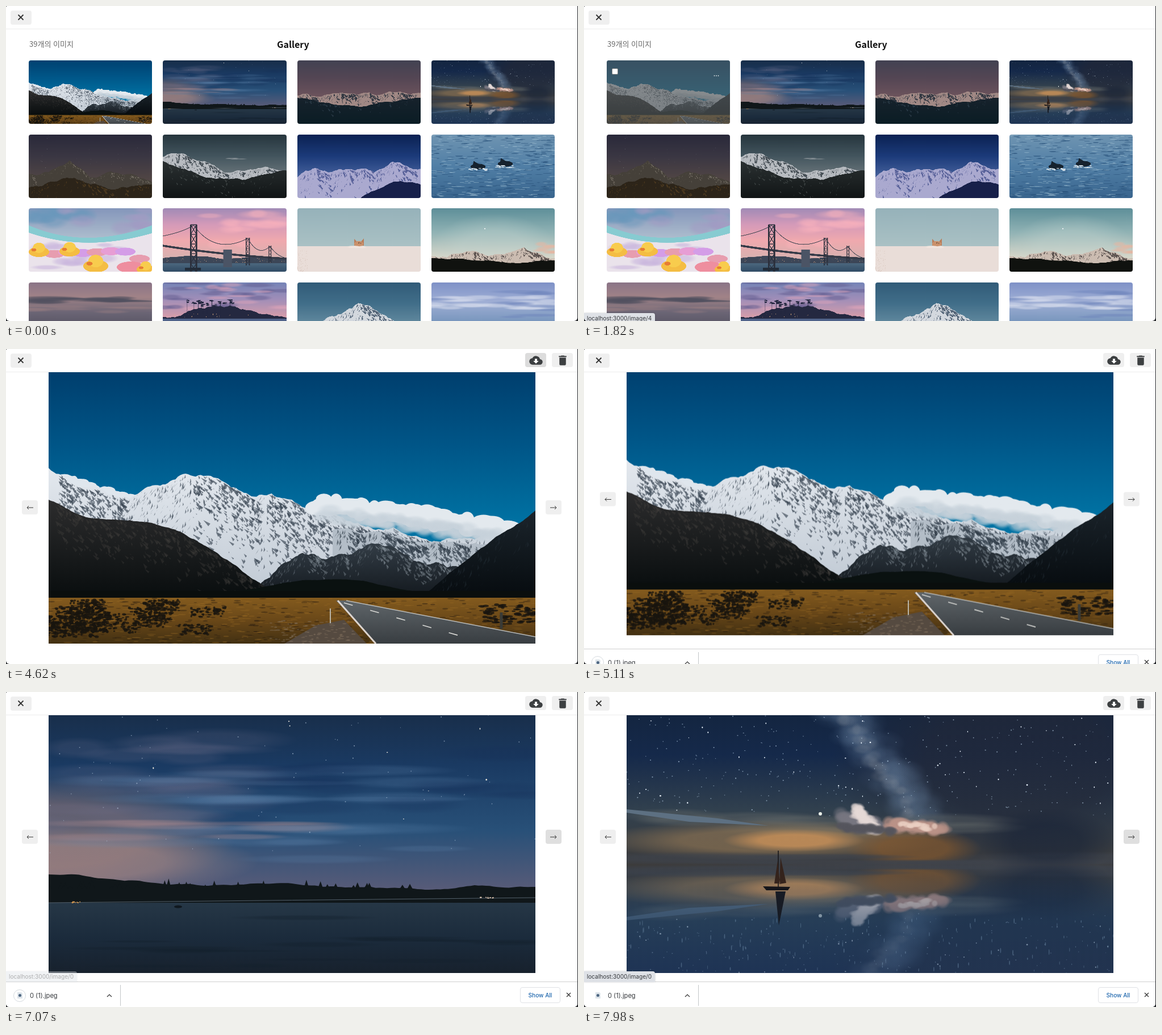
Write an HTML page with a canvas that moves like this. It is 1007x556 px and loops after 8 s.

```html
<!DOCTYPE html>
<html lang="ko">
<head>
<meta charset="utf-8">
<title>Gallery</title>
<style>
html, body { margin: 0; width: 100%; height: 100%; overflow: hidden; background: #26282b; }
div, canvas, svg, span { position: absolute; box-sizing: border-box; white-space: nowrap; }
#win { left: 0; top: 0; width: 1006px; height: 556px; background: #fff; border-radius: 3px 0 6px 6px; overflow: hidden; }
#gallery, #detail { inset: 0; }
#head { left: 0; top: 0; width: 1006px; height: 41px; background: #fff; border-bottom: 1px solid #ececec; }
.btn { background: #efefef; border-radius: 4px; width: 37px; height: 25px; }
.btn svg { left: 50%; top: 50%; transform: translate(-50%, -50%); }
.nav { width: 28px; top: 266.5px; }
svg { fill: #3c3f41; overflow: visible; }
.line { fill: none; stroke: #333; }
.cjk { font-family: "Noto Sans CJK KR", "Noto Sans CJK", sans-serif; }
.ui { font-family: Inter, sans-serif; font-size: 10.1px; line-height: 16px; color: #33363a; }
.tile { width: 217.5px; height: 112px; border-radius: 4px; overflow: hidden; }
.tile canvas { width: 100%; height: 100%; object-fit: cover; }
#hover { inset: 0; background: rgba(86, 90, 92, .66); }
#check { left: 9.5px; top: 14px; width: 11px; height: 11px; background: #fff; border: 1px solid #858585; border-radius: 2px; }
#more { left: 188px; top: 14px; color: #fff; font: 13px/18px "Noto Sans", sans-serif; }
#big { left: 74.5px; top: 38px; }
#spin { left: 491px; top: 267px; }
#status { left: 0; width: 125px; height: 19px; padding: 1px 5px; background: #dee1e6; border-radius: 0 4px 0 0; box-shadow: 0 0 3px #0003; }
#shelf { left: 0; width: 1006px; height: 45px; background: #fff; border-top: 1px solid #cfcfcf; }
#ring { left: 13px; top: 12.5px; width: 22px; height: 22px; border: 1.2px solid #d5dade; border-radius: 50%; }
#all { left: 905px; top: 9px; width: 71px; height: 28px; border: 1px solid #dfe1e5; border-radius: 4px; color: #1d66ad; font-weight: 500; line-height: 27px; text-align: center; }
</style>
</head>
<body>
<div id="win">
  <div id="gallery">
    <span class="cjk" style="left:41px;top:57px;font-size:13px;line-height:20px;color:#666">39개의 이미지</span>
    <span class="cjk" style="left:477px;top:55px;font-size:16px;line-height:24px;font-weight:700;color:#111">Gallery</span>
  </div>
  <div id="detail">
    <svg id="spin" width="24" height="24"><path d="M17 7A7 7 0 1 0 18.7 14" fill="none" stroke="#3c3f41" stroke-width="2"/><path d="M20 4v7h-7z"/></svg>
    <div id="photo">
      <canvas id="big" width="857" height="482"></canvas>
      <div class="btn nav" style="left:28px"><svg class="line" width="12" height="8"><path d="M12 5H1M4 2 1 5l3 3"/></svg></div>
      <div class="btn nav" id="next" style="left:950px"><svg class="line" width="12" height="8"><path d="M0 5h11M8 2l3 3-3 3"/></svg></div>
    </div>
  </div>
  <div id="head">
    <div class="btn" style="left:8px;top:7.5px"><svg class="line" width="9" height="9" style="left:18px" stroke-width="1.8"><path d="M0 0l9 9M9 0 0 9"/></svg></div>
    <div id="tools">
      <div class="btn" id="cloud" style="left:914px;top:7px"><svg width="23" height="23" viewBox="0 0 24 24"><path d="M6 20A6 6 0 0 1 5.4 8a7.5 7.5 0 0 1 14 2A5 5 0 0 1 19 20z"/><path d="M17 13l-5 5-5-5h3V9h4v4z" fill="#fff"/></svg></div>
      <div class="btn" style="left:961px;top:7px"><svg width="23" height="23" viewBox="0 0 24 24"><path d="M6 7h12v12q0 2-2 2H8q-2 0-2-2zM5 4h3.5l1-1h5l1 1H19v2H5z"/></svg></div>
    </div>
  </div>
  <div id="shelf" class="ui">
    <div id="ring"></div>
    <svg width="9" height="11" style="left:20px;top:18px"><path fill="#dde4ea" d="M0 0h7l2 2v9H0z"/><circle cx="4.5" cy="5.5" r="2.5" fill="#4c6580"/></svg>
    <span style="left:42px;top:16px;font-size:11.1px">0 (1).jpeg</span>
    <svg class="line" width="8" height="5" style="left:178px;top:21px" stroke-width="1.2"><path d="M0 5l4-4 4 4"/></svg>
    <div style="left:201px;top:5px;width:1px;height:37px;background:#c4c6c8"></div>
    <div id="all">Show All</div>
    <svg class="line" width="7" height="7" style="left:987px;top:19px" stroke-width="1.3"><path d="M0 0l7 7M7 0 0 7"/></svg>
  </div>
  <div id="status" class="ui"></div>
</div>
<script>
const $ = id => document.getElementById(id);
const W = 857, H = 482, UNIT = W / 217;
let c, seed, span;

const rnd = (lo, hi) => {
  seed = seed * 16807 % 2147483647;
  return lo + (hi - lo) * seed / 2147483647;
};
const repeat = (n, fn) => { for (let i = 0; i < n; i++) fn(i, i / n); };
const grad = (y0, y1, ...cols) => {
  const g = c.createLinearGradient(0, y0, 0, y1);
  cols.forEach((k, i) => g.addColorStop(i / (cols.length - 1), k));
  return g;
};
const box = (fill, x, y, w, h) => { c.fillStyle = fill; c.fillRect(x, y, w, h); };
const sky = (y1, ...cols) => box(grad(0, y1, ...cols), 0, -20, 900, 600);
const shape = (fill, d) => { c.fillStyle = fill; c.fill(new Path2D(d)); };
const line = (color, width, d) => {
  c.strokeStyle = color;
  c.lineWidth = width;
  c.stroke(new Path2D(d));
};
const dot = (fill, x, y, rx, ry = rx) => {
  c.beginPath();
  c.ellipse(x, y, rx, ry, 0, 0, 7);
  c.fillStyle = fill;
  c.fill();
};
// Soft ellipse; color is #rrggbbaa
const glow = (color, x, y, rx, ry) => {
  c.save();
  c.translate(x, y);
  c.scale(rx, ry);
  const g = c.createRadialGradient(0, 0, 0, 0, 0, 1);
  g.addColorStop(0, color);
  g.addColorStop(.5, color);
  g.addColorStop(1, color.slice(0, 7) + '00');
  box(g, -1, -1, 2, 2);
  c.restore();
};
// Random ellipses within a rectangle, hard or soft
const scatter = (n, fill, x0, y0, x1, y1, rx, ry = rx, draw = dot) =>
  repeat(n, () => draw(fill, rnd(x0, x1), rnd(y0, y1), rnd(.4, 1) * rx, rnd(.4, 1) * ry));
const wisps = (...args) => scatter(...args, glow);
const stars = (n, color, y1, r) => scatter(n, color, 0, 0, span, y1, r);
// Puffs along a straight line
const bank = (n, color, x0, y0, x1, y1, r, spread, draw = dot) => repeat(n, (i, k) =>
  draw(color, x0 + (x1 - x0) * k + rnd(-r, r) / 2, y0 + (y1 - y0) * k + rnd(-spread, spread), rnd(.4, 1) * r, rnd(.3, .6) * r));

// Fractal skyline through evenly spaced heights; rocks are shards running down its slopes
function ridge(heights, fill, rough, { x0 = 0, x1 = span, rock, n = 0, size = 4, depth = 30 } = {}) {
  let ys = heights;
  for (; ys.length < 120; rough /= 2)
    ys = ys.flatMap((y, i) => i ? [(y + ys[i - 1]) / 2 + rnd(-rough, rough) / 2, y] : [y]);
  const step = (x1 - x0) / (ys.length - 1);
  c.save();
  c.beginPath();
  ys.forEach((y, i) => c.lineTo(x0 + i * step, y));
  c.lineTo(x1, 600);
  c.lineTo(x0, 600);
  c.clip();
  box(fill, 0, -20, 900, 620);
  repeat(n, () => {
    const i = Math.floor(rnd(4, ys.length - 4));
    const x = x0 + i * step, y = ys[i] + rnd(0, 1) * rnd(.1, 1) * depth;
    const s = rnd(.2, 1) * size, w = Math.sign(ys[i + 4] - ys[i - 4]) * s * rnd(.1, 1.2);
    shape(rock, `M${x} ${y}l${w + s * .4} ${s * .7}l${-s * .4} ${s * .5}z`);
  });
  c.restore();
}

function valley() {
  sky(270, '#003e6d', '#005688', '#0072a3');
  bank(40, '#dfe6ed', 35, 192, 150, 232, 15, 4);
  ridge([172, 205, 226, 195, 186, 222, 228, 250, 280, 292, 298, 282, 290], grad(180, 380, '#e2e7ed', '#c3ccd6'), 22,
    { rock: '#3c4856aa', n: 2600, size: 9, depth: 165 });
  bank(110, '#e3e9ee', 478, 234, 810, 282, 25, 9);
  bank(70, '#c6d1da88', 490, 255, 790, 292, 26, 9, glow);
  ridge([282, 285, 300, 302, 305, 290], '#b3bdc7', 16, { x0: 500, rock: '#34404caa', n: 800, size: 10, depth: 75 });
  ridge([380, 322, 326, 310, 338, 345], grad(305, 390, '#333d46', '#161c22'), 24, { x0: 370, x1: 760, rock: '#a2adb855', n: 420, size: 9, depth: 45 });
  ridge([228, 262, 272, 315, 381], grad(230, 390, '#2c2c2d', '#0b0f10'), 14, { x1: 380, rock: '#47423f55', n: 380, size: 10, depth: 90 });
  ridge([402, 348, 293, 247], grad(247, 390, '#1b242b', '#080d11'), 8, { x0: 650, rock: '#2c374055', n: 160, size: 12, depth: 90 });
  ridge([388, 370, 371, 392], '#0a1110', 4, { x0: 340, x1: 660 });
  box('#0a0e0d', 0, 389, W, 13);
  box(grad(400, H, '#845b1e', '#694718', '#423012'), 0, 401, W, 82);
  scatter(420, '#a0702755', 0, 402, W, H, 9, 1.2);
  scatter(380, '#2a1f1277', 0, 402, W, H, 7, 1.3);
  repeat(22, () => {
    const x = rnd(0, 1) * rnd(0, 420), y = rnd(412, 462);
    scatter(55, '#19150fcc', x - 30, y - 9, x + 30, y + 9, 4, 2.5);
  });
  scatter(90, '#18140fcc', 760, 413, W, 448, 7, 2.5);
  shape('#554a40', 'M470 450L520 440L560 482H415z');
  scatter(110, '#84736077', 390, 440, 540, H, 4, 1.3);
  shape(grad(405, H, '#60666a', '#383d41'), 'M506 406H524L857 470V482H576z');
  line('#dcd4cf', 3, 'M509 406L576 482');
  line('#b9bab8', 1.4, 'M524 406L857 470');
  c.setLineDash([16, 32]);
  line('#d9d9d5', 1.6, 'M520 410L730 470');
  c.setLineDash([]);
  line('#b9b5a8', 2, 'M496 420v26');
  line('#393a36', 5, 'M797 427v29');
}

function lake() {
  sky(345, '#182b44', '#1a3a62', '#285078', '#5c5c78');
  glow('#94706c88', 0, 240, 330, 110);
  glow('#b8938a77', 40, 285, 330, 60);
  wisps(22, '#6f6e8a30', -30, 70, 330, 240, 160, 24);
  wisps(22, '#5f85ad35', 100, 120, 820, 290, 210, 13);
  wisps(7, '#a5868c55', 20, 205, 480, 250, 170, 11);
  wisps(12, '#132b5535', 320, 90, 860, 240, 150, 20);
  stars(80, '#b6c8dcaa', 270, 1.1);
  stars(8, '#e6e4dc', 270, 1.8);
  ridge([308, 316, 326, 327, 324, 331, 333, 327, 330], '#10171a', 8);
  repeat(45, () => {
    const x = rnd(0, W * .75), h = rnd(0, 1) * rnd(2, 16);
    shape('#10171a', `M${x} ${329 - h}l5 ${h + 5}h-10z`);
  });
  box(grad(357, H, '#263746', '#1b2b3c', '#17212d'), 0, 358, W, 130);
  wisps(18, '#13202c66', 0, 375, W, 470, 150, 6);
  line('#53606b', 1, 'M0 358L857 349');
  scatter(12, '#d89a52', 38, 356, 58, 358, 2, 1);
  scatter(9, '#f2d6c0', 757, 347, 790, 350, 2, 1.2);
  dot('#10181f', 228, 365, 7, 2.5);
}

function boat() {
  sky(291, '#13243d', '#15294a', '#31404e', '#3c3b3b');
  glow('#222838bb', 690, 110, 330, 190);
  bank(50, '#6d88a81a', 365, 0, 525, 215, 55, 8, glow);
  bank(26, '#7e879433', 380, 20, 510, 210, 22, 8, glow);
  stars(330, '#bed5ec99', 205, 1.2);
  stars(45, '#edf6ff', 195, 1.5);
  wisps(10, '#6b706e55', 0, 203, 640, 235, 180, 16);
  glow('#8e7453aa', 250, 248, 310, 36);
  glow('#c28d58dd', 295, 248, 125, 20);
  glow('#80572fbb', 505, 262, 120, 36);
  wisps(6, '#3e434caa', 0, 275, W, 291, 300, 14);
  glow('#18233788', 740, 250, 120, 60);
  shape('#5d7082', 'M0 193L160 209L250 222L110 215L0 199z');
  bank(40, '#77768088', 385, 205, 440, 225, 24, 10, glow);
  bank(40, '#e5d9d6aa', 402, 193, 436, 228, 15, 6, glow);
  bank(40, '#ba9287aa', 465, 220, 555, 228, 22, 6, glow);
  bank(22, '#eacfc2aa', 485, 218, 540, 226, 12, 4, glow);
  bank(20, '#54545ccc', 375, 224, 470, 230, 18, 3, glow);
  dot('#e9eee8', 341, 201, 3);
  c.save();
  c.translate(0, 582);
  c.scale(1, -1);
  c.drawImage(c.canvas, 0, 0, W, 291, 0, 0, W, 291);
  c.restore();
  box(grad(291, H, '#1d3c6000', '#1d3c6088', '#243a5b99'), 0, 291, W, 200);
  scatter(120, '#7190ac77', 0, 385, W, 480, 1, 5);
  shape('#15151a', 'M240 329L288 330L284 336H246z');
  line('#18171a', 1.6, 'M267 266V330');
  shape('#34231c', 'M266 284L260 324H270zM271 278L281 323L269 325z');
  shape('#171b24', 'M262 338H280L268 398z');
}

// The remaining scenes are drawn in thumbnail units
function duskPeaks() {
  sky(62, '#424252', '#544654', '#6b535c');
  ridge([62, 64, 58, 60, 61, 55, 57], '#a18985', 9, { rock: '#303640', n: 520, size: 5, depth: 24 });
  ridge([66, 73, 79, 82, 74, 70, 66], grad(65, 112, '#17222c', '#0b1d25'), 5, { rock: '#263642', n: 60, size: 5, depth: 20 });
}
function nightPeak() {
  sky(80, '#29293a', '#3b3743', '#514645');
  stars(60, '#bbb7', 60, .3);
  ridge([70, 66, 46, 76, 65, 70, 84], '#454039', 8, { rock: '#8a8379aa', n: 260, size: 3, depth: 22 });
  ridge([94, 84, 77, 88, 97, 91, 88], '#2c2419', 8, { rock: '#4c391f', n: 170, size: 5, depth: 35 });
}
function greyPeaks() {
  sky(75, '#26353d', '#42545d', '#6c777c');
  ridge([40, 34, 47, 68, 64, 57, 64], '#b7bbc0', 8, { rock: '#454e55', n: 420, size: 5, depth: 32 });
  ridge([47, 61, 75, 78, 80, 70, 64], grad(50, 112, '#2a3031', '#111516'), 6, { rock: '#3a4040', n: 90, size: 5, depth: 40 });
  wisps(5, '#a2a8ac88', 115, 42, 140, 44, 12, 1.5);
}
function bluePeaks() {
  sky(78, '#0b2152', '#1c3b7a', '#4a659f');
  ridge([76, 60, 67, 63, 61, 67, 51, 55, 61], '#aaa9cf', 9, { rock: '#59629a', n: 420, size: 6, depth: 52 });
  ridge([113, 95, 82, 88], '#17204a', 6, { x0: 110 });
}
function sea() {
  sky(112, '#7095b2', '#517fa6', '#39658e');
  scatter(330, '#264f7888', 0, 0, 217, 117, 8, .9);
  scatter(250, '#a0bfd288', 0, 0, 217, 117, 7, .7);
  repeat(2, i => {
    const x = 82 + i * 48, y = 57 - i * 5;
    dot('#16222e', x, y, 13, 5);
    shape('#16222e', `M${x - 9} ${y - 2}l1 -8l10 6z`);
    scatter(16, '#d5e1e9', x - 16, y + 3, x + 16, y + 7, 4, 1);
  });
}
function bath() {
  const duck = (x, y, r) => {
    dot('#f4bd43', x, y, r, r * .5);
    dot('#f8cc4d', x, y - r * .4, r * .6, r * .5);
    dot('#e77c33', x - r * .5, y - r * .2, r * .25, r * .15);
  };
  sky(70, '#8496bb', '#a0b0c7', '#b9cad5');
  wisps(12, '#6797bb77', 0, 0, 100, 35, 32, 17);
  wisps(10, '#a29bc388', 60, 0, 217, 40, 35, 15);
  shape('#87cbd1', 'M0 30Q100 74 217 30V120H0z');
  shape('#eae3eb', 'M0 43Q100 78 217 44V120H0z');
  wisps(14, '#c9b5dd99', 0, 62, 217, 115, 32, 10);
  repeat(7, i => dot(`hsl(${345 - i % 3 * 30} 60% 76%)`, 45 + i * 25, rnd(75, 90), 18, 7));
  dot('#ee8e9f', 180, 104, 25, 10);
  duck(18, 77, 18);
  duck(72, 76, 18);
  duck(118, 102, 22);
  duck(206, 108, 16);
}
function bridge() {
  const ink = '#2b2f3b';
  const tower = (x, y, h, w) => {
    line(ink, w / 4, `M${x - w / 2} ${y}v${h}m${w} 0v${-h}`);
    repeat(5, (i, k) => line(ink, w / 9, `M${x - w / 2} ${y + h * k}l${w} ${h / 5}m${-w} 0l${w} ${-h / 5}h${-w}`));
  };
  sky(85, '#a18bb6', '#d49ab9', '#f0a9ae', '#dab1b0');
  wisps(12, '#ffb5bd66', 80, 0, 217, 65, 45, 12);
  ridge([88, 84, 90, 84, 87], '#3c4657', 3);
  scatter(65, '#e8b28a', 0, 88, 217, 96, .6);
  box(grad(95, 112, '#506b82', '#314c65'), 0, 97, 217, 25);
  line('#363b48', 3.5, 'M0 66Q100 82 217 89');
  line('#474955', 1, 'M0 49Q35 42 54 30Q92 83 149 53Q167 87 188 67Q200 85 217 88');
  tower(54, 29, 85, 10);
  tower(149, 52, 49, 6);
  tower(188, 66, 30, 4);
  box('#4b5465', 106, 73, 15, 31);
  box('#222c39', 39, 105, 28, 5);
}
function cat() {
  sky(70, '#96b2ba', '#abc2c5');
  box('#e9ddd8', 0, 67, 217, 60);
  scatter(110, '#d4bfb4', 0, 72, 18, 116, .5);
  shape('#b97e5b', 'M100 66V54L105 59H112L117 53V66z');
  dot('#c9906b', 108, 63, 8, 5);
  scatter(2, '#39312c', 104, 61, 113, 62, 1);
  wisps(5, '#f1e5df', 88, 68, 128, 69, 12, 3);
}
function dawnPeaks() {
  sky(86, '#5e8f99', '#91b3b5', '#d6d6c9');
  glow('#c5d5d066', 110, 70, 110, 60);
  wisps(8, '#e5b6a299', 190, 63, 217, 78, 18, 5);
  dot('#fff', 94, 36, .8);
  ridge([84, 87, 79, 77, 83, 78, 69, 79, 88], '#cbbcb1', 8, { rock: '#5b524f', n: 380, size: 5, depth: 24 });
  ridge([88, 89, 93, 96, 92], '#10120f', 4);
}
function duskClouds() {
  sky(80, '#8a7487', '#a18387', '#6b6575', '#565362');
  wisps(16, '#51505faa', 0, 28, 217, 36, 70, 5);
  wisps(8, '#9b7f8266', 0, 42, 217, 54, 60, 4);
}
function palms() {
  sky(60, '#7484b7', '#a08eb8', '#d39cab');
  wisps(18, '#655f9288', 0, 0, 217, 45, 38, 6);
  wisps(12, '#dfa5ba77', 30, 5, 217, 48, 35, 5);
  ridge([61, 56, 47, 44, 49, 56, 62], '#242840', 9);
  repeat(12, i => {
    const x = 45 + i * 7 + rnd(-3, 3), y = rnd(31, 43);
    line('#242840', .7, `M${x} 56V${y}`);
    scatter(6, '#242840', x - 3, y - 2, x + 3, y + 2, 3, 1);
  });
  scatter(18, '#e8b482', 20, 56, 150, 62, .7);
  box('#50638a', 0, 64, 217, 60);
}
function lonePeak() {
  sky(75, '#315b78', '#416e89', '#648ba0');
  ridge([85, 60, 37, 56, 85], '#d3d8de', 13, { x0: 25, x1: 190, rock: '#536477', n: 300, size: 6, depth: 38 });
}
function blueClouds() {
  sky(70, '#7e91c7', '#a0afd5', '#7896bd');
  wisps(18, '#d7dded88', 0, 26, 217, 47, 55, 6);
  wisps(10, '#6c83bb77', 0, 8, 217, 65, 60, 5);
}

const large = [valley, lake, boat];
const scenes = [valley, lake, duskPeaks, boat, nightPeak, greyPeaks, bluePeaks, sea,
  bath, bridge, cat, dawnPeaks, duskClouds, palms, lonePeak, blueClouds];
const pictures = scenes.map((draw, i) => {
  const canvas = document.createElement('canvas');
  canvas.width = W;
  canvas.height = H;
  c = canvas.getContext('2d');
  seed = 4321 + i * 977;
  span = W;
  if (!large.includes(draw)) {
    span = 217;
    c.setTransform(UNIT, 0, 0, UNIT, 0, 20);
  }
  draw();
  const tile = document.createElement('div');
  tile.className = 'tile';
  tile.style.left = 39.7 + i % 4 * 236.4 + 'px';
  tile.style.top = 96 + Math.floor(i / 4) * 130.5 + 'px';
  tile.append(canvas);
  $('gallery').append(tile);
  if (!i) tile.insertAdjacentHTML('beforeend', '<div id="hover"><div id="check"></div><span id="more">...</span></div>');
  return canvas;
});

const big = $('big').getContext('2d');
const ramp = (t, a, b) => Math.max(0, Math.min(1, (t - a) / (b - a)));
const show = (id, on) => $(id).style.visibility = on ? 'visible' : 'hidden';
let shown = -1;

function frame(now) {
  const t = now % 8000;
  const open = t >= 2450, loaded = t >= 3640;
  const rise = 1 - (1 - ramp(t, 5000, 5300)) ** 2;
  show('gallery', !open);
  show('tools', open);
  show('spin', open && !loaded);
  show('photo', loaded);
  $('hover').style.opacity = ramp(t, 1120, 1540);
  $('spin').style.transform = `rotate(${(t - 3500) * .36}deg)`;
  $('photo').style.transform = `translateY(${-24 * rise}px)`;
  $('cloud').style.background = t >= 4620 && t < 5040 ? '#dcdcdc' : '';
  $('next').style.background = t >= 6720 ? '#dfdfdf' : '';
  $('shelf').style.top = 556 - 45 * rise + 'px';
  $('ring').style.opacity = 1 - ramp(t, 7400, 7950);

  const status = $('status');
  status.textContent = 'localhost:3000/image/' + (t < 5000 ? 4 : 0);
  status.style.top = 541.5 - 48.5 * rise + 'px';
  status.style.opacity = t >= 7070 ? ramp(t, 6980, 7210) : ramp(t, 1120, 1400) - ramp(t, 2450, 2700);

  // Next picture every 420 ms once the arrow is clicked
  const index = Math.max(0, Math.floor((t - 7070) / 420) + 1);
  if (index !== shown) big.drawImage(pictures[shown = index], 0, 0);
  requestAnimationFrame(frame);
}
requestAnimationFrame(frame);
</script>
</body>
</html>
```
